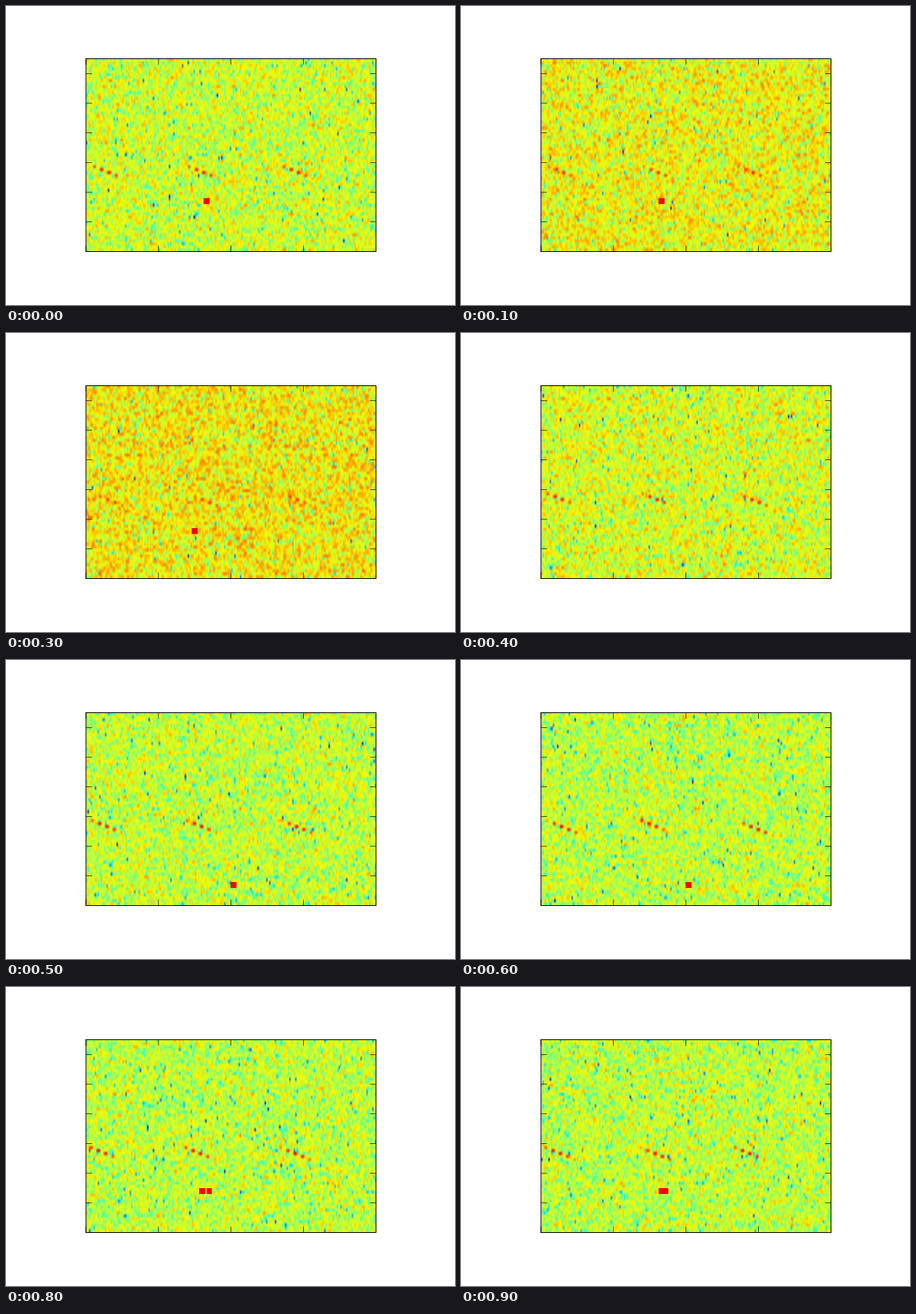
Recreate the animation shown at these times as a matplotlib script. Size 600 by 400 pixels, loop 1 s.

```python
import numpy as np
import matplotlib.pyplot as plt
from matplotlib.animation import FuncAnimation
from matplotlib.lines import Line2D
from matplotlib.patches import Rectangle

WIDTH, HEIGHT, DPI = 600, 400, 100
LEFT, RIGHT, TOP, BOTTOM = 106.9, 494.4, 70.5, 328.5
ROWS, COLS = 65, 200
CELL_W, CELL_H = (RIGHT - LEFT) / COLS, (BOTTOM - TOP) / ROWS
FRAMES, INTERVAL = 10, 100

# Marker corners, held from each frame until the next key
MARKER_KEYS = {
    0: [(264, 257)],
    2: [(248, 261)],
    4: [],
    5: [(300, 297)],
    7: [(258, 269)],
    8: [(258, 269), (267.5, 269)],
    9: [(264, 269), (269.5, 269)],
}

fig = plt.figure(figsize=(WIDTH / DPI, HEIGHT / DPI), dpi=DPI, facecolor="white")
ax = fig.add_axes([0, 0, 1, 1])
image = ax.imshow(np.zeros((ROWS, COLS)), cmap="jet", vmin=0, vmax=1,
                  origin="lower", extent=(LEFT, RIGHT, BOTTOM, TOP),
                  aspect="auto", interpolation="bilinear",
                  interpolation_stage="rgba")
ax.set_xlim(0, WIDTH)
ax.set_ylim(HEIGHT, 0)
ax.axis("off")


def stroke(xs, ys, pixels=1.0):
    ax.add_line(Line2D(xs, ys, color="black", linewidth=pixels * 72 / DPI,
                       snap=False, solid_capstyle="butt", zorder=4))


def draw_border(tick=8, thin=0.7):
    for y in (TOP, BOTTOM):
        stroke((LEFT - .5, RIGHT + .5), (y, y))
    for x in (LEFT, RIGHT):
        stroke((x, x), (TOP, BOTTOM))
    for x in np.linspace(LEFT, RIGHT, 5):
        stroke((x, x), (TOP, TOP + tick), thin)
        stroke((x, x), (BOTTOM - tick, BOTTOM), thin)
    for row in range(10, ROWS, 10):
        y = BOTTOM - row * CELL_H
        stroke((LEFT, LEFT + tick), (y, y), thin)
        stroke((RIGHT - tick, RIGHT), (y, y), thin)


def log_noise(rng):
    """Log power of complex noise: broad peaks and narrow deep nulls."""
    shape = ROWS, COLS + 2
    z = rng.normal(size=shape) + 1j * rng.normal(size=shape)
    z = z[:, 1:-1] + .45 * (z[:, :-2] + z[:, 2:])
    power = np.log(np.abs(z) ** 2)
    return (power - power.mean()) / power.std()


def add_dot(field, x, row, level):
    distance = np.arange(COLS) + .5 - (x - LEFT) / CELL_W
    field[row] = np.maximum(field[row], level - .09 * distance ** 2)


def spectrogram(i):
    rng = np.random.default_rng(100 + i)
    swell = np.exp(-((i - 2.2) / 1.7) ** 2)   # the noise floor rises and falls
    field = .575 + .09 * swell + .082 * log_noise(rng)
    middle = 264 - .55 * i                    # the bursts drift to the left
    for burst in (-1, 0, 1):
        center = rng.uniform(-.8, .8) + swell / 2
        for k in range(-4, 7):
            x = middle + 126.5 * burst + 9.7 * k
            level = .94 - .06 * swell - .035 * (k - center) ** 2
            add_dot(field, x, 26 - k, level)
    add_dot(field, 313, 32, .78)
    return np.clip(field, 0, 1)


draw_border()
squares = [ax.add_patch(Rectangle((0, 0), 7.5, 8, facecolor="red", linewidth=0,
                                  antialiased=False, zorder=3))
           for _ in range(2)]


def update(i):
    image.set_data(spectrogram(i))
    corners = MARKER_KEYS[max(key for key in MARKER_KEYS if key <= i)]
    for n, square in enumerate(squares):
        square.set_visible(n < len(corners))
        if n < len(corners):
            square.set_xy(corners[n])
    return [image, *squares]


animation = FuncAnimation(fig, update, frames=FRAMES, interval=INTERVAL,
                          repeat=True, repeat_delay=0, blit=False)
plt.show()
```
